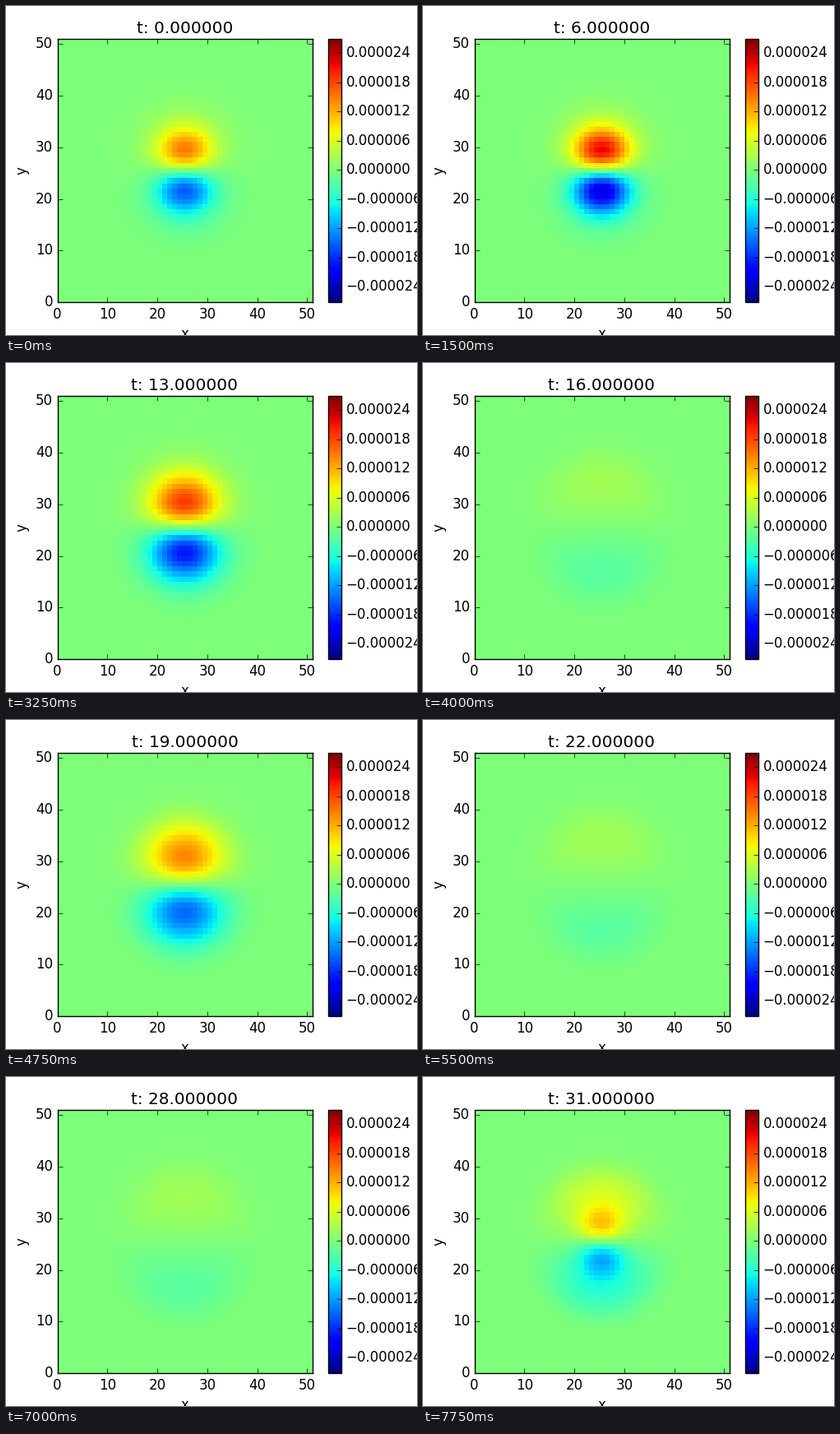
Recreate the animation shown at these times as a matplotlib script. Size 500 by 400 pixels, loop 8000 ms.

```python
import numpy as np
import matplotlib.pyplot as plt
from matplotlib.animation import FuncAnimation

plt.style.use("classic")
plt.rcParams.update({
    "font.family": "DejaVu Sans",
    "figure.facecolor": "white",
    "savefig.dpi": "figure",
})

N = 51
FRAMES = 32
UNIT = 1e-5

# Envelope of the lobes at the moments of greatest contraction
KEY_T = [0, 6, 13, 19, 25, 31]
CORE_AMP = [1.43, 2.18, 1.86, 1.20, 0.60, 0.79]
CORE_SIZE = [4.0, 4.0, 4.8, 5.2, 3.8, 3.3]
DISC_AMP = [0.0, 0.0, 0.06, 0.20, 0.70, 0.50]
DISC_SIZE = [13.0, 13.0, 13.0, 13.0, 13.0, 14.0]

offset = np.arange(N) - N // 2
dx, dy = np.meshgrid(offset, offset)
r = np.hypot(dx, dy)


def dipole(size):
    """Pair of opposite lobes, peaking at 1 a distance `size` from the centre."""
    return dy / size * np.exp(0.5 - r**2 / (2 * size**2))


def disc(size):
    """Two flat half discs of opposite sign."""
    return dy / np.sqrt(r**2 + 16) * np.exp(-(r / size)**6)


def halo(size):
    """Wide opposite lobes with a steep outer edge."""
    return dy / size * np.exp(0.25 - (r / size)**4 / 4)


def field(t):
    core_amp, core_size, disc_amp, disc_size = (
        np.interp(t, KEY_T, values)
        for values in (CORE_AMP, CORE_SIZE, DISC_AMP, DISC_SIZE))
    breath = (0.5 + 0.5 * np.cos(t))**1.5
    lobes = core_amp * dipole(core_size) + disc_amp * disc(disc_size)
    total = breath * lobes + (0.24 - 0.12 * breath) * halo(9)
    return UNIT * np.where(total < 0, 1.04 * total, total)


def tick_text(value, pos=None):
    return f"{value:.6f}".replace("-", "\u2212")


fig = plt.figure(figsize=(5, 4), dpi=100)
ax = fig.add_axes([0.125, 0.1, 0.62, 0.8])
cax = fig.add_axes([0.78375, 0.1, 0.032, 0.8])

edges = np.arange(N + 1)
mesh = ax.pcolormesh(edges, edges, field(0), cmap="jet",
                     vmin=-2.72 * UNIT, vmax=2.69 * UNIT)
ax.set(xlim=(0, N), ylim=(0, N), xlabel="x", ylabel="y")
ax.set_xticks(range(0, N, 10))
ax.set_yticks(range(0, N, 10))
title = ax.set_title("t: 0.000000")

fig.colorbar(mesh, cax=cax, ticks=[0.6 * UNIT * k for k in range(-4, 5)],
             format=plt.FuncFormatter(tick_text))


def update(t):
    mesh.set_array(field(t))
    title.set_text(f"t: {t:.6f}")
    return mesh, title


anim = FuncAnimation(fig, update, frames=FRAMES, interval=250,
                     repeat=True, repeat_delay=0, blit=False)
plt.show()
```
